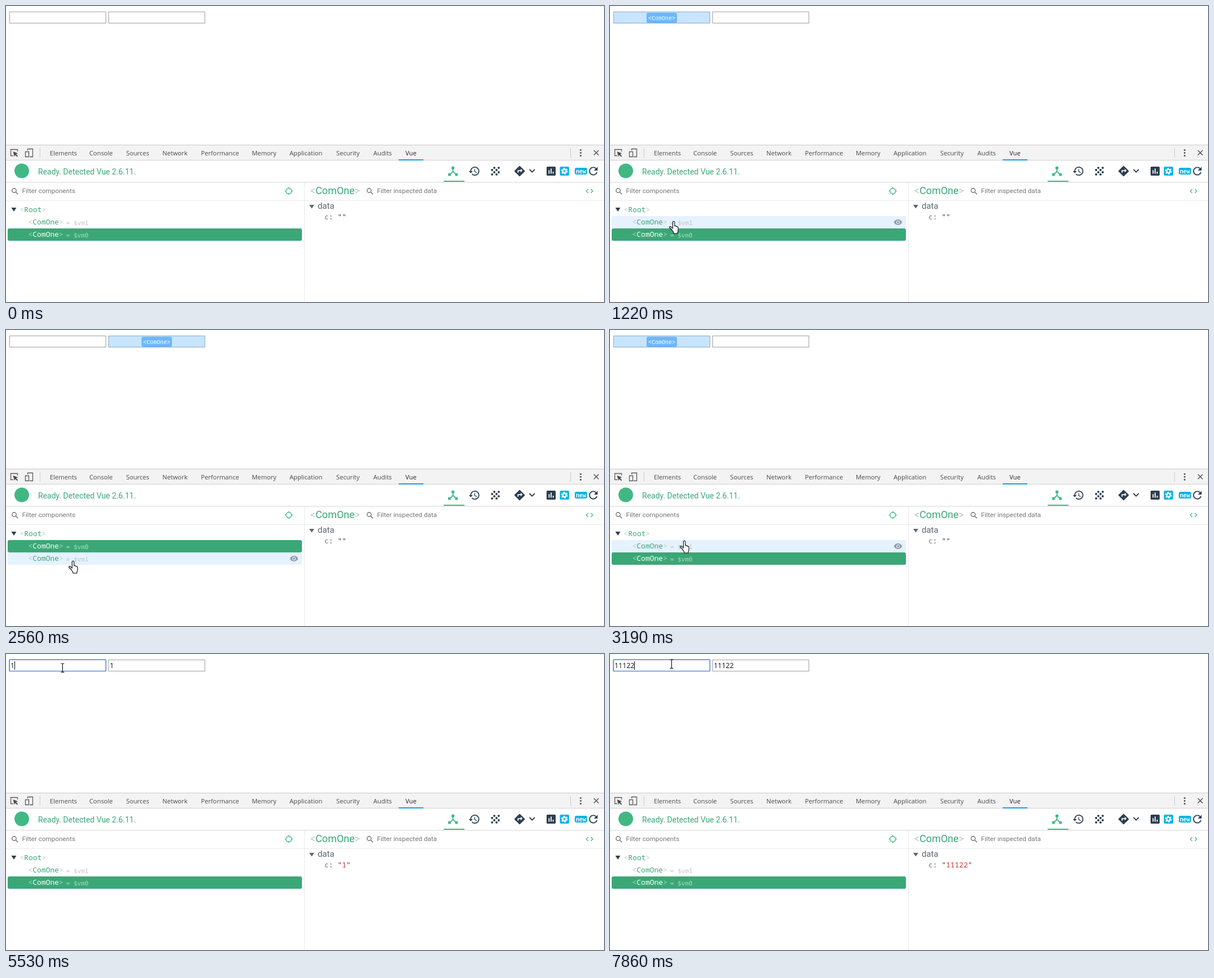
Recreate the animation shown at these times as an HTML page. Size 1063 by 527 pixels, loop 8 s.

```html
<!DOCTYPE html>
<html lang="en">
<head>
<meta charset="utf-8">
<title>Component inspector</title>
<style>
html, body { margin: 0; width: 100%; height: 100%; overflow: hidden; background: #fff; }
svg { display: block; }
.tab { font: 11.2px "Open Sans", sans-serif; fill: #4a4a4a; }
.roboto { font-family: Roboto, sans-serif; }
.hint { font-size: 11.75px; fill: #757575; }
.mono { font: 13px "Noto Sans Mono", monospace; }
.vm { font: 11px "DejaVu Sans Mono", monospace; }
.value { font: 12.4px "Open Sans", sans-serif; fill: #111; }
.label { font: 10px "Liberation Mono", monospace; fill: #fff; text-anchor: middle; }
.green { fill: #3ba776; }
.dim { fill: #c4c4c4; }
.line { fill: none; stroke: #5a5a5a; stroke-width: 1.3; }
.row rect { fill: none; }
.row .eye { visibility: hidden; fill: #8d99a3; }
.row.hover rect { fill: #e5f2ff; }
.row.hover .eye { visibility: visible; }
.row.selected rect { fill: #3ba776; }
.row.selected .name, .row.selected .vm, .row.selected .eye { fill: #fff; }
.row.selected .dim { fill: #a5dcc2; }
</style>
</head>
<body>
<svg width="1063" height="527" viewBox="0 0 1063 527">
  <defs>
    <g id="search" fill="none" stroke="#6f6f6f" stroke-width="1.4">
      <circle cx="4.5" cy="4.5" r="3.7"/><path d="M7.3 7.3l4 4"/>
    </g>
    <path id="eye" transform="scale(.66) translate(-12 -12)" d="M12 4.5C7 4.5 2.73 7.61 1 12c1.73 4.39 6 7.5 11 7.5s9.27-3.11 11-7.5c-1.73-4.39-6-7.5-11-7.5zM12 17c-2.76 0-5-2.24-5-5s2.24-5 5-5 5 2.24 5 5-2.24 5-5 5zm0-8c-1.66 0-3 1.34-3 3s1.34 3 3 3 3-1.34 3-3-1.34-3-3-3z"/>
  </defs>

  <!-- page -->
  <g fill="#fff" stroke="#a0a0a0">
    <rect x="6.5" y="10.5" width="171" height="20"/>
    <rect x="182.5" y="10.5" width="171" height="20"/>
  </g>
  <rect id="focus" x="6" y="10" width="171.5" height="20.5" rx="1" fill="none" stroke="#5d8fdb" stroke-width="1.7"/>
  <text id="first" class="value" x="8" y="25"/>
  <text id="second" class="value" x="184.5" y="25"/>
  <rect id="caret" y="13" width="1" height="15"/>
  <g id="overlay">
    <rect id="area" y="10" height="21" fill="#68b6ff" fill-opacity=".36"/>
    <rect id="badge" y="12" height="18" rx="3" fill="#6cb7fd"/>
    <text id="label" class="label" y="24.5"/>
  </g>

  <!-- tab bar -->
  <rect y="247" width="1063" height="28" fill="#f3f3f3"/>
  <path d="M0 247.5H1063M60.5 253v17M1003.5 253v17" stroke="#c9c9c9"/>
  <path d="M0 274.5H1063" stroke="#cfcfcf"/>
  <g class="line">
    <path d="M13 266.5H8.5V255.5H20.5V259"/>
    <path d="M38.5 257V254.5H47.5V268.5H42M34.5 259.5h6v9h-6z"/>
    <path d="M1045 257l8.5 8.5m0-8.5l-8.5 8.5" stroke-width="1.6"/>
  </g>
  <path d="M12.5 259l9 3.4-3.6 1.4 3.3 3.4-1.4 1.4-3.4-3.4-1.4 3.2z" fill="#4a4a4a"/>
  <g fill="#555"><circle cx="1021.5" cy="256.5" r="1.6"/><circle cx="1021.5" cy="261.5" r="1.6"/><circle cx="1021.5" cy="266.5" r="1.6"/></g>
  <g id="tabs" class="tab"></g>
  <rect x="698" y="273" width="44" height="2" fill="#1b9ddb"/>

  <!-- toolbar -->
  <rect y="313" width="1063" height="1" fill="#e6e6e6"/>
  <rect y="314" width="1063" height="1" fill="#f1f1f1"/>
  <rect y="315" width="1063" height="1" fill="#f9f9f9"/>
  <circle cx="28" cy="293.5" r="13" fill="#41b883"/>
  <text class="roboto green" x="57" y="300" font-size="14">Ready. Detected Vue 2.6.11.</text>
  <rect x="778" y="311" width="37" height="2" fill="#42b983"/>
  <g id="icons" fill="#2c3e50"></g>
  <path d="M930.5 291l4.7 4.7 4.7-4.7" fill="none" stroke="#2c3e50" stroke-width="1.8"/>
  <rect x="984.5" y="286" width="16.5" height="16" rx="2" fill="#0fb3e6"/>
  <circle cx="992.7" cy="294" r="4.9" fill="none" stroke="#fff" stroke-width="2" stroke-dasharray="2.6 2.53"/>
  <circle cx="992.7" cy="294" r="3.1" fill="none" stroke="#fff" stroke-width="2.2"/>
  <rect x="1011" y="288" width="22" height="12" rx="3" fill="#0fb3e6"/>
  <text x="1022" y="298" text-anchor="middle" fill="#fff" font-family="Liberation Mono, monospace" font-weight="bold" font-size="10">new</text>

  <!-- panels -->
  <path d="M0 346.5H1063M530.5 314V527" stroke="#e9e9e9"/>
  <use href="#search" x="10" y="324"/>
  <text class="roboto hint" x="28.5" y="333">Filter components</text>
  <g fill="none" stroke="#42b983" stroke-width="1.3">
    <circle cx="502.7" cy="329.5" r="5"/>
    <path d="M502.7 322.5v2m0 10v2M495.7 329.5h2m10 0h2"/>
    <path d="M1035 326l-3.5 3.5 3.5 3.5M1039.500 326l3.500 3.500-3.500 3.500"/>
  </g>
  <text class="roboto green" x="541" y="334.500" font-size="18"><tspan class="dim">&lt;</tspan>ComOne<tspan class="dim">&gt;</tspan></text>
  <use href="#search" x="641" y="324"/>
  <text class="roboto hint" x="659.5" y="333">Filter inspected data</text>
  <path d="M539 354h9l-4.5 6.500z" fill="#5b6670"/>
  <text class="roboto" x="554" y="361" font-size="15" fill="#5a6670">data</text>
  <text class="mono" x="566" y="380" fill="#333"><tspan fill="#777">c</tspan>: "<tspan id="datum" fill="#d0332b"/>"</text>
  <g id="tree"></g>
  <path d="M9.500 359h9l-4.500 7z" fill="#2c3e50"/>

  <!-- pointer -->
  <circle id="click" r="11.5" fill="#f8ea2a" fill-opacity=".8"/>
  <g id="pointer" stroke-linejoin="round">
    <path data-kind="arrow" d="M0 0v16l3.700-3.500 2.400 5.600 2.300-1-2.400-5.400h5z" fill="#fff" stroke="#000"/>
    <path data-kind="beam" d="M-3 -7.500h2.200q.8 0 .8.800V7q0 .8-.8.800H-3M3 -7.500H.8Q0 -7.500 0 -6.700M3 7.800H.8Q0 7.800 0 7" fill="none" stroke="#111" stroke-width="1.200"/>
    <path data-kind="hand" d="M.5 13V2a1.700 1.700 0 0 1 3.400 0V8.500q2-.8 2.200.9 2-.6 2.100.9 2-.3 2 1.500v4.500q0 2-1.200 3.500v2.200H2v-2.200q-1.500-1.500-3-4.300L-4.800 12q-1-2 .6-2.400 1.500-.2 3 2z" fill="#fff" stroke="#000" stroke-width="1.100"/>
  </g>
</svg>
<script>
const LOOP = 8000;
const $ = id => document.getElementById(id);
const show = (el, on) => { el.style.visibility = on ? 'visible' : 'hidden'; };
const setAttrs = (el, attrs) => { for (const k in attrs) el.setAttribute(k, attrs[k]); };

const tabs = { Elements: 78, Console: 148, Sources: 213.5, Network: 278, Performance: 346.5, Memory: 437,
  Application: 504, Security: 587, Audits: 653, Vue: 710 };
$('tabs').innerHTML = Object.entries(tabs).map(([name, x]) =>
  `<text x="${x}" y="266"${name === 'Vue' ? ' fill="#222"' : ''}>${name}</text>`).join('');

const dots = ['6 10', '6 18', '10 6', '10 14', '14 10', '14 18', '18 6', '18 14']
  .map(p => `M${p}m-2 0a2 2 0 1 0 4 0a2 2 0 1 0 -4 0`).join('');
// centre x, scale, path in a 24 unit box
const icons = [
  [794.5, .95, 'M17 16l-4-4V8.82C14.16 8.4 15 7.3 15 6c0-1.66-1.34-3-3-3S9 4.34 9 6c0 1.3.84 2.4 2 2.82V12l-4 4H3v5h5v-3.05l4-4.2 4 4.2V21h5v-5h-4z', '#42b983'],
  [832.5, .9, 'M13 3c-4.97 0-9 4.03-9 9H1l3.89 3.89.07.14L9 12H6c0-3.87 3.13-7 7-7s7 3.13 7 7-3.13 7-7 7c-1.93 0-3.68-.79-4.94-2.06l-1.42 1.42C8.27 19.99 10.51 21 13 21c4.97 0 9-4.03 9-9s-4.03-9-9-9zm-1 5v5l4.28 2.54.72-1.21-3.5-2.08V8z'],
  [870, .98, dots],
  [913, .93, 'M21.71 11.29l-9-9c-.39-.39-1.02-.39-1.41 0l-9 9c-.39.39-.39 1.02 0 1.41l9 9c.39.39 1.02.39 1.41 0l9-9c.39-.38.39-1.01 0-1.41zM14 14.5V12h-4v3H8v-4c0-.55.45-1 1-1h5V7.5l3.5 3.5z'],
  [969, .9, 'M19 3H5c-1.1 0-2 .9-2 2v14c0 1.1.9 2 2 2h14c1.1 0 2-.9 2-2V5c0-1.1-.9-2-2-2zM9 17H7v-7h2zm4 0h-2V7h2zm4 0h-2v-4h2z'],
  [1044, .95, 'M17.65 6.35C16.2 4.9 14.21 4 12 4c-4.42 0-7.99 3.58-7.99 8s3.57 8 7.99 8c3.73 0 6.84-2.55 7.73-6h-2.08c-.82 2.33-3.04 4-5.65 4-3.31 0-6-2.69-6-6s2.69-6 6-6c1.66 0 3.14.69 4.22 1.78L13 11h7V4z']
];
$('icons').innerHTML = icons.map(([x, s, d, fill]) =>
  `<path transform="translate(${x} 294) scale(${s}) translate(-12 -12)" d="${d}"${fill ? ` fill="${fill}"` : ''}/>`).join('');

// tree rows, each with the page area it lights up
const rows = [
  { name: 'Root', top: 352, indent: 25, x: 6, width: 1051 },
  { name: 'ComOne', top: 374, indent: 40, x: 6, width: 172 },
  { name: 'ComOne', top: 396, indent: 40, x: 182, width: 172 }
];
$('tree').innerHTML = rows.map(({ name, top, indent }, i) => `<g class="row">
  <rect x="3" y="${top}" width="523" height="22" rx="3"/>
  <text class="mono" x="${indent - .5}" y="${top + 15}"><tspan class="dim">&lt;</tspan><tspan class="name green">${name}</tspan><tspan class="dim">&gt;</tspan></text>
  ${i ? `<text class="vm dim" x="107" y="${top + 15.5}"></text>` : ''}
  <use class="eye" href="#eye" x="512" y="${top + 11}"/></g>`).join('');
const rowEls = [...document.querySelectorAll('.row')];
const pointers = [...$('pointer').children];

// time, x, y of the pointer
const path = [
  [150, 766, 439], [290, 560, 350], [540, 41, 119], [760, 85, 250], [920, 122, 322], [1010, 124, 330],
  [1080, 119, 356], [1150, 114, 372], [1220, 111, 383], [1780, 111, 383],
  [1850, 113, 390], [2000, 118, 408], [2170, 119, 415], [2479, 119, 415], [2560, 117, 411],
  [3120, 117, 411], [3190, 130, 375], [3259, 130, 375], [3260, 128, 330],
  [3480, 118, 150], [3720, 106, 14], [3889, 106, 14], [4030, 92, 27],
  [4340, 92, 27], [4810, 100, 24], [6140, 100, 24], [6290, 106, 20], [6520, 107, 19],
  [6770, 107, 18], [7080, 108, 17], [7400, 109, 17]
];
const typed = [5530, 5670, 5920, 7550, 7860];
const clicks = [[1630, 1780], [2800, 2960], [4200, 4340]];
const caretOn = [[4200, 4740], [5270, 6460], [7020, LOOP]];
const within = (t, spans) => spans.some(([a, b]) => t >= a && t < b);

function pointerAt(t) {
  const i = path.findIndex(p => p[0] > t);
  if (i < 0) return path[path.length - 1].slice(1);
  if (i === 0) return path[0].slice(1);
  const [a, b] = [path[i - 1], path[i]];
  const k = (t - a[0]) / (b[0] - a[0]);
  return [a[1] + (b[1] - a[1]) * k, a[2] + (b[2] - a[2]) * k];
}

function pointerKind(x, y) {
  if (x < 526 && y >= 352 && y < 418) return 'hand';
  if (x > 25 && x < 490 && y > 315 && y < 346) return 'beam';
  if (x > 6 && x < 178 && y > 10 && y < 31) return 'beam';
  return 'arrow';
}

function drawTree(x, y, active, selected) {
  const hover = active && x < 526 ? rows.findIndex(r => y >= r.top && y < r.top + 22) : -1;
  rowEls.forEach((el, i) => {
    el.classList.toggle('hover', i === hover);
    el.classList.toggle('selected', i === selected);
    const vm = el.querySelector('.vm');
    if (vm) vm.textContent = i === selected ? '= $vm0' : '= $vm1';
  });
  show($('overlay'), hover >= 0);
  if (hover < 0) return;
  const { name, x: left, width } = rows[hover];
  const mid = left + width / 2, half = name.length * 3 + 9;
  setAttrs($('area'), { x: left, width });
  setAttrs($('badge'), { x: mid - half, width: half * 2 });
  setAttrs($('label'), { x: mid });
  $('label').textContent = `<${name}>`;
}

function draw(t) {
  const [x, y] = pointerAt(t);
  const active = t >= 150;
  const kind = pointerKind(x, y);
  pointers.forEach(p => show(p, active && p.dataset.kind === kind));
  const shift = kind === 'beam' ? .5 : 0;
  setAttrs($('pointer'), { transform: `translate(${Math.round(x) + shift} ${Math.round(y) + shift})` });
  setAttrs($('click'), { cx: x, cy: y });
  show($('click'), within(t, clicks));

  drawTree(x, y, active, t >= 1780 && t < 2960 ? 1 : 2);

  const text = '11122'.slice(0, typed.filter(at => t >= at).length);
  for (const id of ['first', 'second', 'datum']) $(id).textContent = text;
  show($('focus'), t >= 4200);
  show($('caret'), within(t, caretOn));
  setAttrs($('caret'), { x: 8 + 7 * text.length });
}

const start = performance.now();
function tick() {
  draw((performance.now() - start) % LOOP);
  requestAnimationFrame(tick);
}
tick();
</script>
</body>
</html>
```
